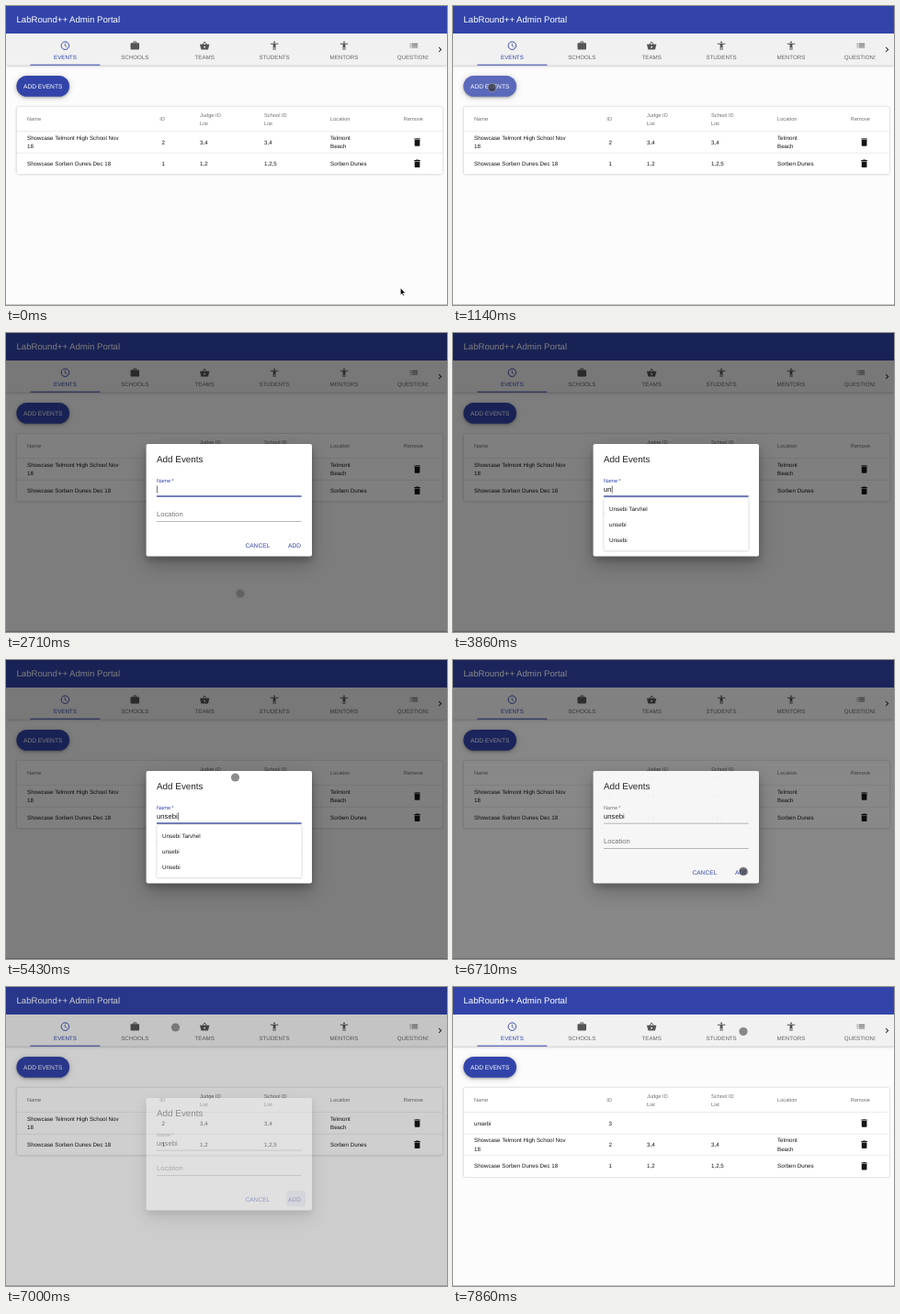
An HTML page for the animation above (8 s loop, 480 by 326 pixels).

```html
<!DOCTYPE html>
<html lang="en">
<head>
<meta charset="utf-8">
<title>Admin Portal</title>
<style>
  html, body { margin: 0; width: 100%; height: 100%; overflow: hidden; background: #fcfcfc; }
  svg { display: block; width: 480px; height: 326px; }
  text { font-family: "Liberation Sans", Arial, sans-serif; white-space: pre; text-rendering: geometricPrecision; }
  .paper { filter: drop-shadow(0 .5px 1.1px rgba(0,0,0,.22)) drop-shadow(0 .8px .5px rgba(0,0,0,.16)); }
  .bar { filter: drop-shadow(0 .8px .8px rgba(0,0,0,.26)) drop-shadow(0 .5px 2px rgba(0,0,0,.15)); }
  .fab { filter: drop-shadow(0 1.4px 1.2px rgba(0,0,0,.26)) drop-shadow(0 1.6px 3px rgba(0,0,0,.2)); }
  .modal { filter: drop-shadow(0 4px 3.5px rgba(0,0,0,.2)) drop-shadow(0 8px 10px rgba(0,0,0,.24)); }
</style>
</head>
<body>
<svg id="stage" viewBox="0 0 480 326"></svg>
<script>
const BLUE = '#3244aa', GREY = '#666', INK = '#151515';
const RATE = 7, TICKS = 56, ROW = 23.4;
const NAME = 'unsebi';
const TYPED_AT = [26, 27, 29, 30, 31, 32];

const text = (x, y, str, size = 6.2, fill = INK, anchor = 'start', extra = '') =>
  `<text x="${x}" y="${y}" font-size="${size}" fill="${fill}" text-anchor="${anchor}" ${extra}>${str}</text>`;
const rect = (x, y, w, h, fill, extra = '') =>
  `<rect x="${x}" y="${y}" width="${w}" height="${h}" fill="${fill}" ${extra}/>`;

const person = '<circle cx="12" cy="4" r="2"/><path d="M3 7h18v2h-6v13h-2v-6h-2v6H9V9H3z"/>';
const icons = {
  clock: '<g fill="none" stroke="currentColor" stroke-width="2"><circle cx="12" cy="12" r="9"/><path d="M11.8 7v5.6l4.6 2.8" stroke-width="1.6"/></g>',
  bag: '<path d="M4 6h16q2 0 2 2v11q0 2-2 2H4q-2 0-2-2V8q0-2 2-2z"/><path d="M9 6V3h6v3" fill="none" stroke="currentColor" stroke-width="2"/>',
  basket: '<path fill-rule="evenodd" d="M1 9h22l-3 12H4zM12 13a2 2 0 0 0 0 4a2 2 0 0 0 0-4"/><path d="M7.5 9.5L12 3l4.5 6.5" fill="none" stroke="currentColor" stroke-width="2"/>',
  person,
  list: '<path d="M3 7h2v2H3zM7 7h14v2H7zM3 11h2v2H3zM7 11h14v2H7zM3 15h2v2H3zM7 15h14v2H7z"/>',
  next: '<path d="M10 6L8.6 7.4l4.6 4.6-4.6 4.6L10 18l6-6z"/>',
  bin: '<path d="M6 7h12v12q0 2-2 2H8q-2 0-2-2zM5 4h3.5l1-1h5l1 1H19v2H5z"/>'
};
const icon = (name, cx, cy, color) =>
  `<g transform="translate(${cx - 5.7} ${cy - 5.7}) scale(.475)" fill="${color}" color="${color}">${icons[name]}</g>`;

// Stacked lines centred on y
const lines = (x, y, str, size, fill) => {
  const parts = str.split('|');
  return parts.map((s, i) => text(x, y + 2.2 + (i - (parts.length - 1) / 2) * 9.6, s, size, fill)).join('');
};

const tableRow = (id, y, name, num, judges, schools, place) => `<g id="${id}">
  ${rect(11.5, y - ROW / 2 - .2, 463.5, .5, '#dadada')}
  ${lines(23, y, name)}${text(173, y + 2.2, num, 6.2, INK, 'end')}
  ${lines(211, y, judges)}${lines(281, y, schools)}${lines(353, y, place)}
  ${icon('bin', 447.6, y, INK)}</g>`;

const tabs = [['clock', 'EVENTS'], ['bag', 'SCHOOLS'], ['basket', 'TEAMS'],
  ['person', 'STUDENTS'], ['person', 'MENTORS'], ['list', 'QUESTIONS']];

const page = `
  ${rect(0, 0, 480, 326, '#fcfcfc')}
  <g class="bar">${rect(0, 30, 480, 34.7, '#f1f1f1')}</g>
  ${rect(0, 0, 480, 30, BLUE)}
  ${text(11.5, 18.2, 'LabRound++ Admin Portal', 9.6, '#fff')}
  <clipPath id="tabClip">${rect(0, 30, 459.5, 36, '#000')}</clipPath>
  <g clip-path="url(#tabClip)">${tabs.map(([glyph, label], i) => {
    const x = 64.4 + i * 75.9;
    return icon(glyph, x, 43.2, i ? '#555' : BLUE) + text(x, 57.5, label, 6.2, i ? GREY : BLUE, 'middle');
  }).join('')}</g>
  ${icon('next', 472.4, 47.5, INK)}
  ${rect(26.4, 63.7, 76, 1, BLUE)}
  <g class="fab">${rect(11.4, 76, 57.6, 22.8, BLUE, 'rx="11.4"')}</g>
  ${text(40.2, 89.7, 'ADD EVENTS', 6.65, '#fff', 'middle')}
  ${rect(11.4, 76, 57.6, 22.8, '#fff', 'rx="11.4" opacity=".2" id="fabGlow"')}
  <g class="paper">${rect(11.5, 110, 463.5, 73.5, '#fff', 'rx="1.9" id="table"')}</g>
  ${[[23, 'Name'], [211, 'Judge ID|List'], [281, 'School ID|List'], [353, 'Location']]
    .map(([x, s]) => lines(x, 123.2, s, 5.7, '#707070')).join('')}
  ${text(173, 125.4, 'ID', 5.7, '#707070', 'end')}${text(454, 125.4, 'Remove', 5.7, '#707070', 'end')}
  ${tableRow('added', 148.4, NAME, 3, '', '', '')}
  <g id="rows">
    ${tableRow('', 148.4, 'Showcase Telmont High School Nov|18', 2, '3,4', '3,4', 'Telmont|Beach')}
    ${tableRow('', 171.8, 'Showcase Sorben Dunes Dec 18', 1, '1,2', '1,2,5', 'Sorben Dunes')}
  </g>
  ${rect(0, 325, 480, 1, '#c6c6c6')}`;

const dialog = `
  <g class="modal">${rect(152.6, 121, 180.4, 122.5, '#fff', 'rx="1.9"')}</g>
  ${text(164, 141.3, 'Add Events', 9.9, '#222')}
  <g id="label">${text(0, 0, 'Name\u2009*', 7.6, 'currentColor')}</g>
  ${text(164, 173, '', 7.7, INK, 'start', 'id="value"')}
  ${rect(164, 177.8, 157.6, .6, '#8a8a8a')}
  ${rect(164, 177.4, 157.6, 1.2, BLUE, 'id="underline"')}
  ${rect(0, 166.5, .6, 8, INK, 'id="caret"')}
  ${text(164, 200.4, 'Location', 7.6, '#757575')}
  ${rect(164, 205.2, 157.6, .6, '#8a8a8a')}
  ${rect(305.5, 222, 20.5, 17.3, BLUE, 'rx="1.9" opacity=".13" id="addGlow"')}
  ${text(260.4, 233.5, 'CANCEL', 6.65, BLUE)}${text(307, 233.5, 'ADD', 6.65, BLUE)}
  <g id="menu"><g class="paper">${rect(164.2, 180, 157.6, 57.6, '#fff', 'rx="1.5"')}</g>
    ${['Unsebi Tarvhel', 'unsebi', 'Unsebi'].map((s, i) => text(170, 193.6 + i * 17.2, s, 6.3)).join('')}
  </g>`;

const stage = document.getElementById('stage');
stage.innerHTML = `${page}
  ${rect(0, 0, 480, 326, '#000', 'id="shade"')}
  <g id="dialog">${dialog}</g>
  <path id="arrow" transform="translate(429.4 307.6)" d="M0 0v7.5l1.7-1.6 1.2 2.6 1.1-.5-1.2-2.5h2.4z" stroke="#fff" stroke-width=".5"/>
  <circle id="touch" r="4.6" stroke-width=".9"/>`;

const el = {};
stage.querySelectorAll('[id]').forEach(e => { el[e.id] = e; });
const set = (id, attrs) => Object.entries(attrs).forEach(([k, v]) => el[id].setAttribute(k, v));
const show = (id, on) => set(id, { display: on ? 'inline' : 'none' });
const within = (n, a, b) => n >= a && n < b;

// Keys are [tick, value, ...]; values between keys are linear
function track(keys, n) {
  const i = keys.findIndex(k => k[0] > n);
  if (i === 0) return keys[0].slice(1);
  if (i < 0) return keys[keys.length - 1].slice(1);
  const a = keys[i - 1], b = keys[i], p = (n - a[0]) / (b[0] - a[0]);
  return a.slice(1).map((v, j) => v + (b[j + 1] - v) * p);
}

const fade = [[8, 0], [9, .45], [10, .93], [11, 1], [46, 1], [47, .93], [48, .7], [49, .38], [50, 0]];
const path = [[0, 431, 311], [1, 418, 296], [3, 330, 190], [5, 190, 70], [6, 110, 22], [7, 36, 58],
  [8, 42.5, 89], [10, 42.5, 89], [13, 205, 171], [14, 205, 171], [16, 255, 284], [26, 255, 284],
  [34, 254, 228], [37, 249.5, 128], [39, 249.5, 128], [45, 316, 230.5], [47, 316, 230.5],
  [49, 184.5, 44], [55, 316, 48.5]];

function draw(n) {
  const [open] = track(fade, n);
  set('shade', { opacity: open * .5 });
  set('dialog', { opacity: open });
  show('fabGlow', within(n, 8, 12));
  show('addGlow', n >= 48);

  const focused = within(n, 14, 39);
  const typed = NAME.slice(0, TYPED_AT.filter(k => k <= n).length);
  const [focus] = track([[13, 0], [15, 1]], n);
  set('label', {
    transform: `translate(164 ${173.3 - 10.8 * focus}) scale(${1 - focus * .25})`,
    color: focused ? BLUE : '#757575'
  });
  el.value.textContent = typed;
  set('underline', { x: 164 + 78.8 * (1 - focus), width: 157.6 * focus });
  show('underline', focused);
  const blink = within(n, 20, 22) || within(n, 24, 26) || within(n, 35, 37);
  set('caret', { x: 164.3 + (typed ? el.value.getComputedTextLength() : 0) });
  show('caret', focused && !blink);
  show('menu', within(n, 26, 40));
  set('menu', { opacity: track([[38, 1], [40, 0]], n)[0] });

  const saved = n >= 51;
  show('added', saved);
  set('rows', { transform: `translate(0 ${saved ? ROW : 0})` });
  set('table', { height: 73.5 + (saved ? ROW : 0) });

  const [cx, cy] = track(path, n);
  const pressed = within(n, 8, 11) || within(n, 46, 48);
  show('arrow', n < 1);
  show('touch', n >= 1 && !within(n, 26, 34));
  set('touch', {
    cx, cy,
    fill: pressed ? 'rgba(45,45,50,.7)' : 'rgba(85,85,85,.68)',
    stroke: pressed ? 'rgba(175,175,180,.7)' : 'none'
  });
}

function play(now) {
  draw(Math.floor(now * RATE / 1000 + .03) % TICKS);
  requestAnimationFrame(play);
}
draw(0);
requestAnimationFrame(play);
</script>
</body>
</html>
```
